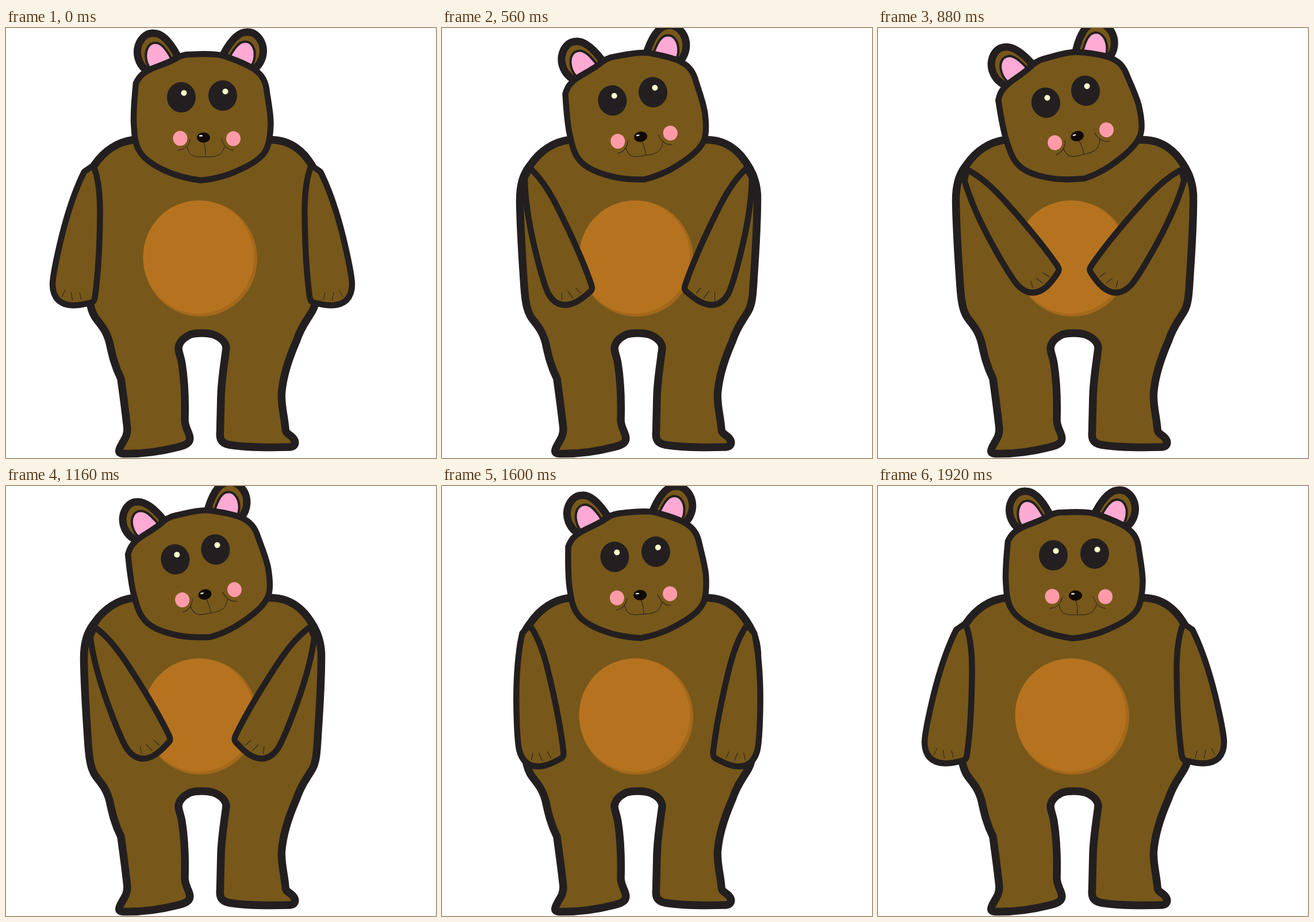
Write an HTML page that moves like this. It is 748 by 748 pixels and loops after 1960 ms.

```html
<!DOCTYPE html>
<html lang="en">
<head>
<meta charset="utf-8">
<title>Bear</title>
<style>
html, body { margin: 0; height: 100%; overflow: hidden; background: #fff; }
svg { display: block; width: 100vw; height: 100vh; }
.fur { fill: #77581a; stroke: #231f20; }
.thin { fill: none; stroke: #231f20; }
.dark { fill: #231f20; }
.glint { fill: #ffffcc; }
.cheek { fill: #ff9ba8; }
</style>
</head>
<body>
<svg viewBox="0 0 748 748">
  <defs>
    <g id="arm">
      <g class="swing">
        <path class="fur" stroke-width="10.5" stroke-linejoin="bevel" d="M152 239C161 262 164 290 163.500 325C163 375 160 430 155 466C154 474 152 477 146 478C137 480 129 482.500 117 482.500C94 482 81 470 81 445C82 425 89 395 97 362C107 322 121 280 136 250Z"/>
        <path class="thin" d="M103 456L97 468M113 459L115.500 474M128 460L131 473"/>
      </g>
    </g>
    <g id="ear">
      <path class="fur" stroke-width="13" d="M242 72C230 61 226 45 230 31C235 16 246 8 257 9C272 9 285 24 297 46L290 80H250Z"/>
      <path fill="#ffaad4" stroke="#231f20" stroke-width="4" d="M249 68C242 57 242 43 246 35C250 27 257 25 263 26C272 28 279 38 287 52L280 75Z"/>
    </g>
  </defs>

  <path class="fur" stroke-width="13.500" d="M222 194.500C195 198 171 213 154 238C140 255 135.500 275 135.500 300C136 350 140 405 143 450C145 478 148 494 157 506C169 521 175 529 180 547C185 570 189 588 200 610C204 640 208 668 211 697C211 709 207 714 202 723C195 735 194 740 205 740.500C235 741 268 737 299 729C316 725 322 720 319 709C317 701 311 693 311 682C312 648 310 610 306 584C304 571 300 565 300 556C302 544 311 538 321 533C332 530 349 530 360 533C374 538 383 547 383 557C380 582 375 610 374 640L372.500 702C371 716 375 722 388 725C420 730 455 730 490 729C505 729 505 720 499 713C494 707 486 706 486 697C484 674 478 655 479.500 635C482 603 494 570 505 545C513 520 525 506 533 492C541 478 541 455 543 425C546 380 549 335 548.500 290C547 263 537 243 520 222C504 204 485 195 462 194.500Z"/>
  <ellipse cx="338" cy="401" rx="99" ry="101" fill="#a4681b"/>
  <ellipse cx="335" cy="398.500" rx="96.500" ry="98.500" fill="#b6731f"/>

  <use href="#arm"/>
  <use href="#arm" transform="translate(683) scale(-1 1)"/>

  <g id="head">
    <use href="#ear"/>
    <use href="#ear" transform="translate(676 -2) scale(-1 1)"/>
    <path class="fur" stroke-width="10.500" d="M226 96C223 125 222 145 222 160C223 183 224 200 231 212C240 230 262 243 291 254C308 260 324 263 338 265C353 264 371 260 386 255C418 243 441 230 450 216C458 205 460 185 460.500 165C460 143 455 122 453 105C450 87 441 78 429 70C413 60 397 55 381 49C367 45 350 45 334 45.500C320 46 310 45 299 51C285 60 267 65 251 72C237 79 232 84 226 96Z"/>
    <ellipse class="dark" cx="305" cy="120.500" rx="25" ry="26.500"/>
    <ellipse class="dark" cx="377" cy="117.500" rx="25" ry="26.500"/>
    <circle class="glint" cx="309.500" cy="113" r="5"/>
    <circle class="glint" cx="381.500" cy="110.500" r="5"/>
    <ellipse class="cheek" cx="303" cy="192" rx="12.500" ry="13"/>
    <ellipse class="cheek" cx="395.500" cy="192.500" rx="12.500" ry="13"/>
    <path class="thin" d="M344 198Q348 210 347 224M315 206C317 220 324 224 336 224H358C370 223 377 218 380 206M299 213Q316 212 321 193M374 192Q380 212 396 213"/>
    <ellipse cx="343.500" cy="190.500" rx="11.500" ry="9" fill="#120a07"/>
    <ellipse cx="339" cy="187.500" rx="3.200" ry="1.200" fill="#fff"/>
  </g>
</svg>
<script>
const STEP = 40, STEPS = 49, PEAK = 23;
const head = document.getElementById("head");
const swing = document.querySelector(".swing");

function draw(now) {
  const k = Math.floor(now / STEP) % STEPS;
  const lift = k < PEAK ? k / PEAK : (STEPS - 1 - k) / (STEPS - 1 - PEAK);
  head.setAttribute("transform", `rotate(${-15 * lift} 335.5 177)`);
  swing.setAttribute("transform", `rotate(${-44.5 * lift} 163 239)`);
  requestAnimationFrame(draw);
}
draw(performance.now());
</script>
</body>
</html>
```
